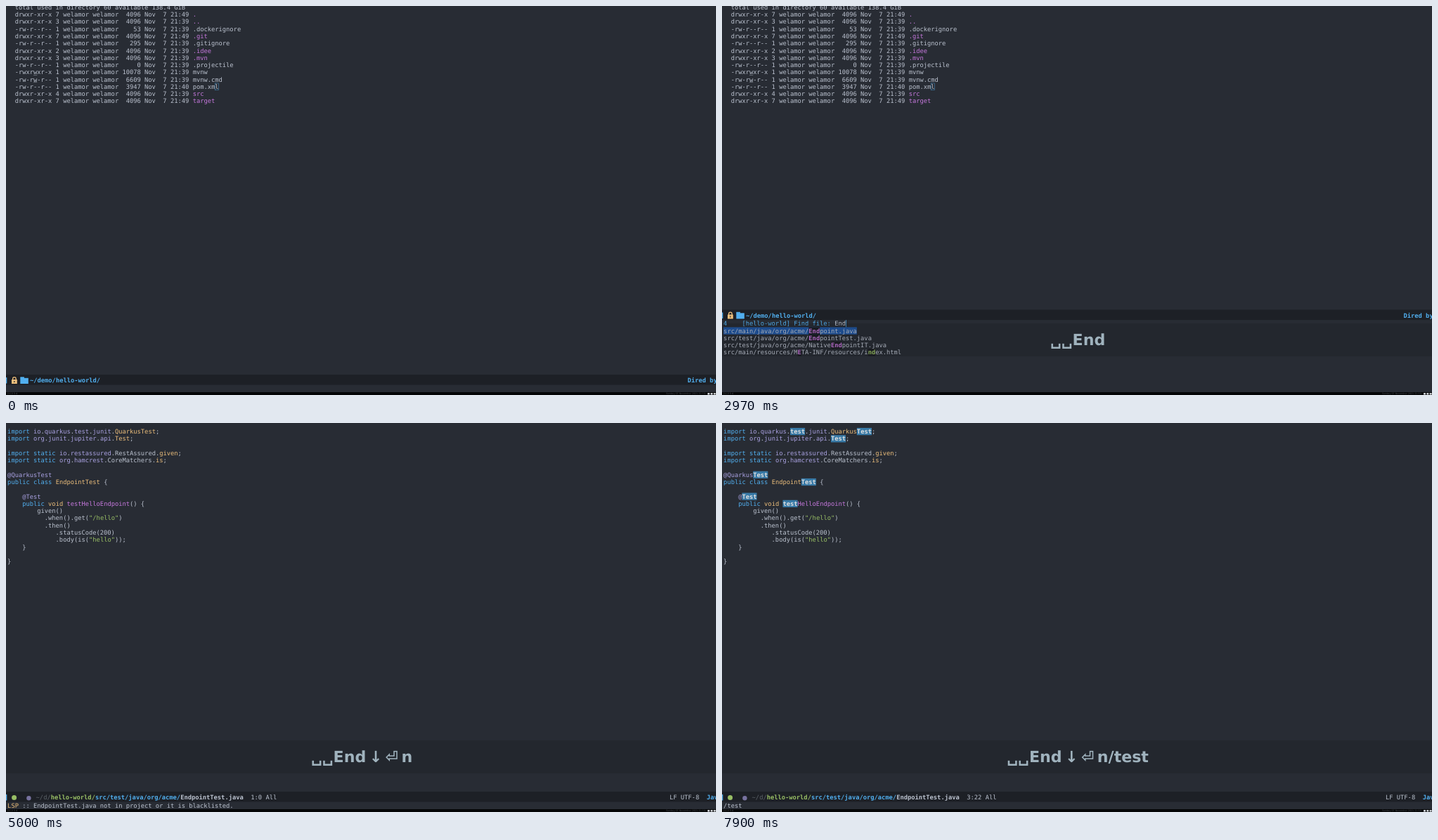
An HTML page with a canvas for the animation above (8000 ms loop, 1010 by 554 pixels).

```html
<!DOCTYPE html>
<html lang="en">
<head>
<meta charset="utf-8">
<title>Find file and search</title>
<style>
  html, body { margin: 0; width: 100%; height: 100%; overflow: hidden; background: #282c34; }
  canvas { display: block; }
</style>
</head>
<body>
<canvas id="stage" width="1010" height="554"></canvas>
<script>
const ctx = document.getElementById('stage').getContext('2d');
const LOOP = 8000, LEFT = 2.11, TOP = 6.95, CELL = 5.271, ROW = 10.278, ASCENT = 8.17;
const PROMPT_TOP = 447.15, ECHO_TOP = PROMPT_TOP + 9 * ROW, MODE_BASELINE = 536.1;
const BG = '#282c34', FG = '#bbc2cf', BLUE = '#51afef', REGION = '#2257a0', MATCH_BG = '#1c1f24';
const COLORS = { f: FG, b: BLUE, v: '#a9a1e1', y: '#ecbe7b', m: '#c678dd', g: '#98be65', d: '#5b6268' };
const MONO = '8.755px "DejaVu Sans Mono", monospace';
const KEY_FONT = 'bold 22.1px "DejaVu Sans", sans-serif';

const files = `drwxr-xr-x 7 4096 21:49 .
drwxr-xr-x 3 4096 21:39 ..
-rw-r--r-- 1 53 21:39 .dockerignore
drwxr-xr-x 7 4096 21:49 .git
-rw-r--r-- 1 295 21:39 .gitignore
drwxr-xr-x 2 4096 21:39 .idee
drwxr-xr-x 3 4096 21:39 .mvn
-rw-r--r-- 1 0 21:39 .projectile
-rwxrwxr-x 1 10078 21:39 mvnw
-rw-rw-r-- 1 6609 21:39 mvnw.cmd
-rw-r--r-- 1 3947 21:40 pom.xml
drwxr-xr-x 4 4096 21:39 src
drwxr-xr-x 7 4096 21:49 target`.split('\n').map(line => line.split(' '));

// ^x switches the colour; an upper-case letter also makes the text bold.
const code = `^bimport ^vio^f.^vquarkus^f.^vtest^f.^vjunit^f.^yQuarkusTest^f;
^bimport ^vorg^f.^vjunit^f.^vjupiter^f.^vapi^f.^yTest^f;

^bimport static ^vio^f.^vrestassured^f.RestAssured.^ygiven^f;
^bimport static ^vorg^f.^vhamcrest^f.CoreMatchers.^yis^f;

^v@QuarkusTest
^bpublic class ^yEndpointTest^f {

    ^v@Test
    ^bpublic ^yvoid ^mtestHelloEndpoint^f() {
        given()
          .when().get(^g"/hello"^f)
          .then()
             .statusCode(200)
             .body(is(^g"hello"^f));
    }

}`.split('\n');

const allFiles = ['.dockerignore', '.gitignore', '.idee/maven.el',
  '.mvn/wrapper/MavenWrapperDownloader.java', '.mvn/wrapper/maven-wrapper.jar',
  '.mvn/wrapper/maven-wrapper.properties', '.projectile', 'mvnw', 'mvnw.cmd'];
const acme = '/java/org/acme/';

// [pressed at, label, underlined until]
const presses = [[970, '␣␣', 1230], [2370, 'E', 2370], [2530, 'n', 2670], [2830, 'd', 2970],
  [3230, '\u2009↓', 3370], [3830, '\u2009⏎', 4030], [4800, '\u2009n', 5000], [6700, '/', 6870],
  [7030, 't', 7200], [7200, 'es', 7370], [7370, 't', 7730]];

const between = (t, from, to) => t >= from && t < to;
const colX = col => LEFT + col * CELL;
const rowY = row => TOP + row * ROW;
const plain = markup => markup.replace(/\^\w/g, '');

function box(color, x, y, w, h) {
  ctx.fillStyle = color;
  ctx.fillRect(x, y, w, h);
}

function text(str, x, baseline, color = FG, font = MONO) {
  ctx.font = font;
  ctx.fillStyle = color;
  ctx.fillText(str, x, baseline);
}

function rich(markup, x, baseline, boldBackground) {
  for (const part of ('^f' + markup).split('^').slice(1)) {
    const run = part.slice(1), key = part[0].toLowerCase(), bold = key !== part[0];
    const width = run.length * CELL;
    if (bold && boldBackground) box(boldBackground, x, baseline - ASCENT, width, ROW);
    text(run, x, baseline, COLORS[key], (bold ? 'bold ' : '') + MONO);
    x += width;
  }
}

function blockCursor(col, row, char) {
  box(BLUE, colX(col), rowY(row), CELL, ROW);
  text(char, colX(col), rowY(row) + ASCENT, BG);
}

function drawModeBar(dy) {
  box('#1d2026', 0, 525 + dy, 1010, 14.6);
  box(BLUE, 0, 529 + dy, 1.3, 8.5);
}

function drawDired(t, dy) {
  text('total used in directory 60 available 138.4 GiB', colX(2), rowY(-1) + ASCENT);
  files.forEach(([mode, links, size, time, name], row) => {
    const y = rowY(row) + ASCENT;
    text(`${mode} ${links} welamor welamor ${size.padStart(5)} Nov  7 ${time}`, colX(2), y);
    text(name, colX(50), y, mode[0] === 'd' ? COLORS.m : FG);
    if (mode[5] === 'w') box(FG, colX(7), y + 1, CELL, 0.4);
  });
  if (t < 300 || between(t, 970, 3830)) {
    ctx.strokeStyle = BLUE;
    ctx.lineWidth = 0.4;
    ctx.strokeRect(colX(56) + 0.2, rowY(10) + 0.2, CELL - 0.4, ROW - 0.4);
  } else if (between(t, 300, 600) || between(t, 3830, 4370)) {
    blockCursor(56, 10, 'l');
  }

  drawModeBar(dy);
  ctx.save();
  ctx.translate(0, dy);
  box(COLORS.y, 8, 532, 7.8, 6);
  box('#1d2026', 11.3, 534, 1.2, 2);
  ctx.strokeStyle = COLORS.y;
  ctx.lineWidth = 1.3;
  ctx.beginPath();
  ctx.arc(11.9, 531, 2.3, Math.PI, 0);
  ctx.lineTo(14.2, 532.5);
  ctx.moveTo(9.6, 531);
  ctx.lineTo(9.6, 532.5);
  ctx.stroke();
  box(BLUE, 20.3, 528.3, 5.6, 2);
  box(BLUE, 20.3, 529.8, 11.5, 8.2);
  rich('^B~/demo/hello-world/', 34, MODE_BASELINE);
  rich('^BDired by name', 969.5, MODE_BASELINE);
  ctx.restore();
}

function candidates(query) {
  if (!query) return allFiles;
  const rest = 'ndpoint', typed = query.length - 1;
  const endpoint = '^ME' + rest.slice(0, typed) + '^f' + rest.slice(typed);
  return ['src/main' + acme + endpoint + '.java',
    'src/test' + acme + endpoint + 'Test.java',
    'src/test' + acme + 'Native' + endpoint + 'IT.java',
    'src/main/resources/M^ME^fTA-INF/resources/i^G' + 'nd'.slice(0, typed) + '^f' + 'nd'.slice(typed) + 'ex.html'];
}

function drawFinder(t) {
  const query = 'End'.slice(0, t < 2370 ? 0 : t < 2530 ? 1 : t < 2830 ? 2 : 3);
  const selected = t < 3230 ? 0 : 1;
  rich(`^b${query ? '4 ' : '17'}   [hello-world] Find file: ^f${query}`, LEFT, PROMPT_TOP + ASCENT);
  if (!between(t, 1500, 2370) && t < 3670) {
    box(BLUE, colX(30 + query.length), PROMPT_TOP, 0.7, ROW);
  }
  candidates(query).forEach((line, i) => {
    const y = PROMPT_TOP + (i + 1) * ROW;
    if (i === selected) box(REGION, LEFT, y, plain(line).length * CELL, ROW);
    rich(line, LEFT, y + ASCENT, MATCH_BG);
  });
}

function drawEditor(t) {
  const query = t < 7030 ? '' : t < 7200 ? 't' : t < 7370 ? 'tes' : 'test';
  code.forEach((line, row) => {
    const y = rowY(row);
    rich(line, LEFT, y + ASCENT);
    if (!query) return;
    for (const match of plain(line).matchAll(new RegExp(query, 'gi'))) {
      box('#387aa7', colX(match.index), y, query.length * CELL, ROW);
      text(match[0], colX(match.index), y + ASCENT, '#dfdfdf', 'bold ' + MONO);
    }
  });

  const first = plain(code[0]);
  const point = query ? first.indexOf(query) + query.length : 0;
  if (query && t < 7900) blockCursor(point, 0, first[point]);

  drawModeBar(0);
  for (const [color, x, y, r] of [[COLORS.g, 11.6, 533.4, 3.5], ['#77729f', 32.4, 534.2, 3.2]]) {
    ctx.fillStyle = color;
    ctx.beginPath();
    ctx.arc(x, y, r, 0, 7);
    ctx.fill();
  }
  rich(`^d~/d/^Ghello-world/^Bsrc/test/java/org/acme/^FEndpointTest.java^f  ${query ? 3 : 1}:${point} All`,
    42.6, MODE_BASELINE);
  rich('LF UTF-8  ^BJava', 944, MODE_BASELINE);
  rich(t < 6700 ? '^yLSP^f :: EndpointTest.java not in project or it is blacklisted.' : '/' + query,
    LEFT, ECHO_TOP + ASCENT);
}

function drawKeys(t) {
  const pressed = presses.filter(([at]) => t >= at);
  if (!pressed.length) return;
  const label = pressed.map(press => press[1]).join('');
  const color = '#a0b3be', center = 506.1;
  ctx.globalAlpha = Math.min(1, (Math.floor((t - 965) / 65) + 1) / 5);
  box('rgba(0, 0, 0, .12)', 0, 452, 1010, 47);
  ctx.font = KEY_FONT;
  const right = center + ctx.measureText(label).width / 2;
  const lastWidth = ctx.measureText(label.at(-1)).width;
  text(label, 2 * center - right, 482.9, color, KEY_FONT);
  if (t < pressed.at(-1)[2]) box(color, right - lastWidth, 483.6, lastWidth, 1);
  ctx.globalAlpha = 1;
}

function drawDesktopBar() {
  box('#050607', 0, 550, 1010, 4);
  const tiny = '3.3px "DejaVu Sans", sans-serif';
  text('[1] 2 3 4', 2, 553.4, '#555a60', tiny);
  text('Sunday 07 November 2021 21:50', 939, 553.4, '#44484d', tiny);
  for (const x of [998, 1002.3, 1006.6]) box('#c8ccd0', x, 551, 3, 2.6);
}

function draw(t) {
  box(BG, 0, 0, 1010, 554);
  ctx.textRendering = 'geometricPrecision';
  const finding = between(t, 970, 3830);
  if (t < 4800) drawDired(t, finding ? PROMPT_TOP - ECHO_TOP : 0);
  else drawEditor(t);
  if (finding) drawFinder(t);
  drawKeys(t);
  drawDesktopBar();
}

const start = performance.now();
function tick() {
  draw((performance.now() - start) % LOOP);
  requestAnimationFrame(tick);
}
tick();
</script>
</body>
</html>
```
